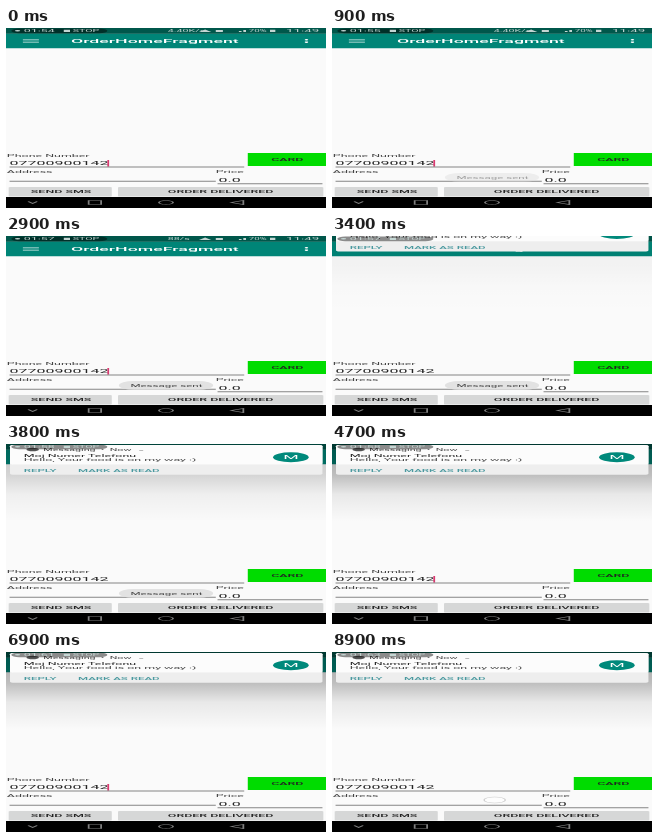
An HTML page that plays this animation: 320 by 180 pixels, repeating every 9100 ms.

```html
<!DOCTYPE html>
<html lang="en">
<head>
<meta charset="utf-8">
<title>Order screen</title>
<style>
  html, body { margin: 0; width: 100%; height: 100%; overflow: hidden; background: #fafafa; }
  svg { display: block; width: 100%; height: 100%; }
  text { font: 14px Roboto, sans-serif; fill: #444; white-space: pre; }
  .medium { font-weight: 500; fill: #222; }
  .mid { text-anchor: middle; }
  .value { font-size: 18px; fill: #222; }
  .status { fill: #c4d6d3; }
  .action { font-size: 13px; font-weight: 500; fill: #4a999f; }
  .field { fill: #858585; }
  .button { fill: #d6d7d7; }
  .nav { fill: none; stroke: #808080; stroke-width: 2; }
</style>
</head>
<body>
<!-- A 360 x 720 dp phone screen squeezed into the wide stage -->
<svg viewBox="0 0 360 720" preserveAspectRatio="none">
  <defs>
    <linearGradient id="shade" x2="0" y2="1">
      <stop offset="0" stop-opacity=".36"/>
      <stop offset=".4" stop-opacity=".24"/>
      <stop offset=".65" stop-opacity=".07"/>
      <stop offset="1" stop-opacity="0"/>
    </linearGradient>
  </defs>
  <rect width="360" height="720" fill="#fafafa"/>

  <rect y="22" width="360" height="59" fill="#008577"/>
  <rect width="360" height="23" fill="#00574b"/>
  <path d="M19 46H37M19 52H37M19 58H37" stroke="#e4f2ef" stroke-width="2"/>
  <text x="73" y="59" style="font-size:20px;font-weight:500;fill:#fff">OrderHomeFragment</text>
  <g fill="#fff">
    <circle cx="338" cy="46" r="2"/><circle cx="338" cy="52" r="2"/><circle cx="338" cy="58" r="2"/>
  </g>
  <text id="speed" class="status" x="182" y="16" style="font-size:12px"></text>
  <g fill="#c4d6d3">
    <path d="M224 6l7 10h-14zM236 8h8v8h-8zM262 16h3v-4h-3zM267 16h3V8h-3z"/>
    <text class="status" x="273" y="16" style="font-size:11px">70%</text>
    <rect x="297" y="7" width="6" height="9"/>
  </g>
  <text class="status" x="315" y="17" style="font-size:15px">11:49</text>

  <text x="1" y="518">Phone Number</text>
  <text class="value" x="4" y="549">07700900142</text>
  <rect id="cursor" x="114" y="528" width="2" height="27" fill="#d83a70"/>
  <rect class="field" x="4" y="554" width="264" height="4"/>
  <rect x="272" y="500" width="88" height="52" fill="#00dc00"/>
  <text class="medium mid" x="316.500" y="531">CARD</text>
  <text x="1" y="582">Address</text>
  <rect class="field" x="4" y="611" width="232" height="4"/>
  <text x="236" y="582">Price</text>
  <text class="value" x="239" y="617">0.0</text>
  <rect class="field" x="238" y="621" width="118" height="4"/>
  <rect class="button" x="3" y="636" width="116" height="38" rx="2"/>
  <text class="medium mid" x="62" y="659">SEND SMS</text>
  <rect class="button" x="126" y="636" width="231" height="38" rx="2"/>
  <text class="medium mid" x="241.500" y="659">ORDER DELIVERED</text>

  <g id="toast">
    <rect x="127" y="580" width="106" height="35" rx="17" fill="#e2e2e2"/>
    <text class="mid" x="180.500" y="604" style="font-size:13px">Message sent</text>
  </g>

  <rect y="676" width="360" height="44" fill="#000"/>
  <g class="nav">
    <path d="M25 694l5 8 5-8M93 690h14v16h-14zM267 690v16l-14-8z"/>
    <circle cx="180" cy="698" r="8"/>
  </g>

  <rect id="scrim" width="360" height="310" fill="url(#shade)"/>
  <g id="notice">
    <rect x="4.500" y="4" width="351.500" height="119" rx="5" fill="#eee"/>
    <rect x="4.500" y="4" width="351.500" height="78" rx="5" fill="#fcfcfc"/>
    <circle cx="30" cy="22" r="7" fill="#555"/>
    <text x="42" y="27" style="font-size:12px">Messaging  •  Now  ⌄</text>
    <text class="medium" x="20" y="53" style="font-weight:400">Moj Numer Telefonu</text>
    <text x="20" y="70">Hello, Your food is on my way :)</text>
    <text class="action" x="20" y="112">REPLY</text>
    <text class="action" x="81" y="112">MARK AS READ</text>
    <circle cx="320.500" cy="53" r="20" fill="#00897b"/>
    <text class="mid" x="320.500" y="60" style="font-size:20px;fill:#fff">M</text>
  </g>

  <rect x="6" y="2" width="108" height="19" rx="9" fill="#000" fill-opacity=".45"/>
  <circle cx="13" cy="11" r="3" fill="#c4d6d3"/>
  <text id="timer" class="status" x="20" y="16"></text>
  <rect x="65" y="7" width="7" height="9" fill="#c4d6d3"/>
  <text class="status" x="75" y="16" style="font-size:12px">STOP</text>

  <circle id="touch" cx="183" cy="592" r="12" fill="#fff" fill-opacity=".6" stroke="#ccc" stroke-width="1.500"/>
</svg>
<script>
  const LOOP = 9100;
  const get = id => document.getElementById(id);
  const ramp = (t, from, to) => Math.min(1, Math.max(0, (t - from) / (to - from)));
  const setOpacity = (id, value) => get(id).setAttribute('opacity', value);

  // Blinks steadily, but rests while the notice slides in and when a finger is down
  function cursorVisible(t) {
    const resting = (t >= 3200 && t < 3900) || t >= 8800;
    const blinkOn = t < 200 || (t - 200) % 985 >= 492;
    return blinkOn && !resting;
  }

  function draw(t) {
    setOpacity('cursor', cursorVisible(t) ? 1 : 0);
    setOpacity('toast', ramp(t, 700, 1100) * (1 - ramp(t, 4200, 4600)));
    setOpacity('touch', t >= 8800 ? 1 : 0);

    const slide = 1 - (1 - ramp(t, 3300, 3750)) ** 3;
    get('notice').setAttribute('transform', `translate(0 ${-130 * (1 - slide)})`);
    setOpacity('scrim', ramp(t, 3300, 4100));

    get('timer').textContent = '01:' + (54 + Math.floor((t + 200) / 1000));
    get('speed').textContent = t < 2100 ? '4.40K/s' : '88/s';
  }

  function frame(now) {
    draw(now % LOOP);
    requestAnimationFrame(frame);
  }
  draw(0);
  requestAnimationFrame(frame);
</script>
</body>
</html>
```
